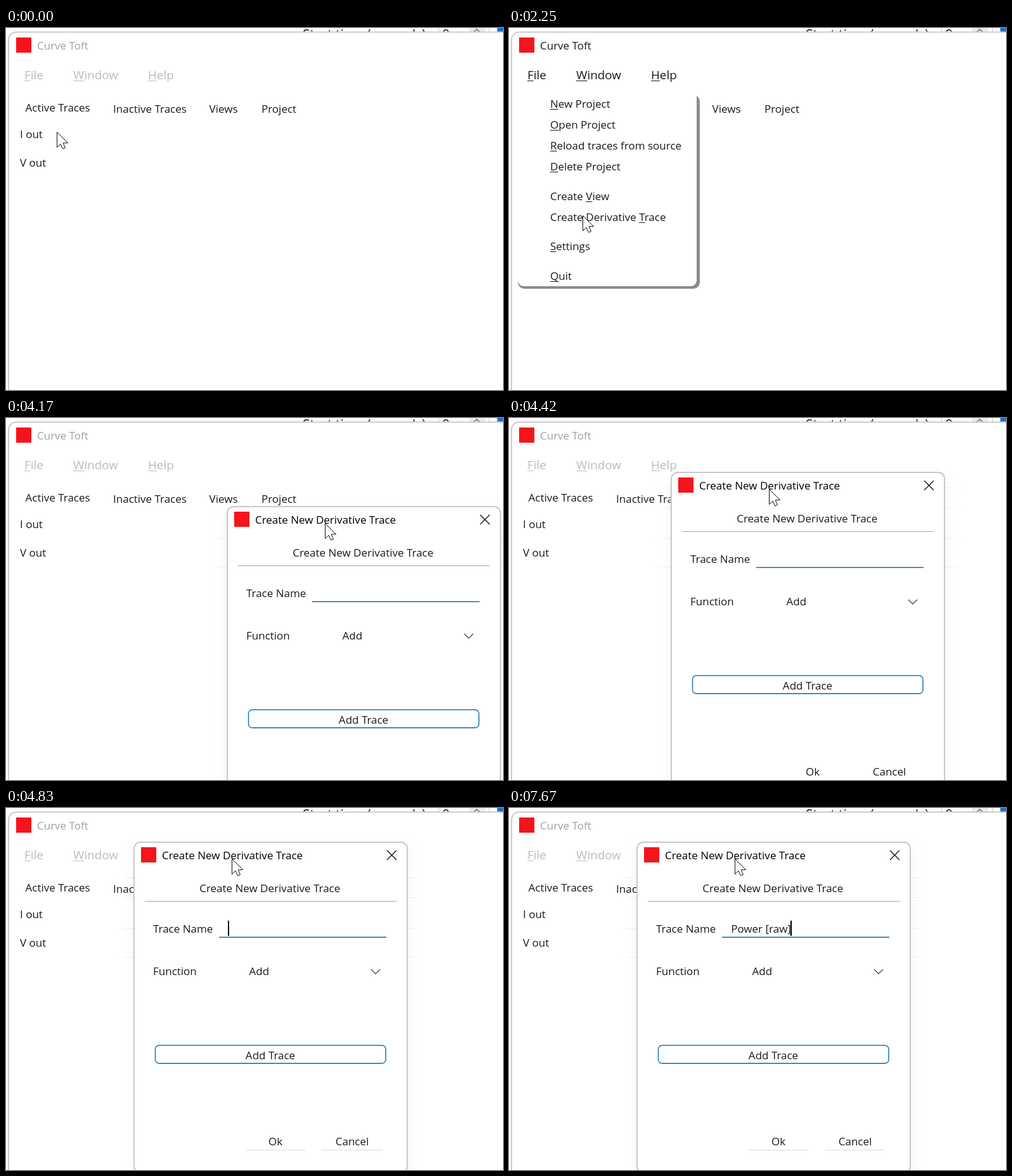
An HTML page with a canvas that plays this animation: 784 px wide and 572 px high, repeating every 8000 ms.

```html
<!DOCTYPE html>
<html lang="en">
<head>
<meta charset="utf-8">
<style>
html, body { margin: 0; height: 100%; overflow: hidden; background: #fff; }
canvas { display: block; }
</style>
</head>
<body>
<canvas id="stage" width="784" height="572"></canvas>
<script>
const c = document.getElementById('stage').getContext('2d');
const LOOP = 8000, TICK = 1000 / 12;
const INK = '#1a1a1a', FAMILY = '"Open Sans", "Noto Sans", sans-serif';

// Paths in ticks (12 per second): [tick, x, y, easing into this point]
const linear = u => u;
const smooth = u => u * u * (3 - 2 * u);
const speedUp = u => u ** 1.4;
const slowDown = u => 1 - (1 - u) ** 2;
const POINTER = [[0, 80, 164], [3, 59, 70, smooth], [16, 59, 70, linear],
  [27, 116, 296, smooth], [36, 116, 296, linear], [41, 678, 278, smooth]];
const DIALOG = [[41, 523, 251], [50, 348, 139, speedUp], [53, 255, 85, linear], [58, 201, 53, slowDown]];

const TYPED = 'Power [raw]';
const KEYS = [67, 70, 72, 73, 74, 75, 77, 87, 89, 90, 92];
const CARET = [[33, 39], [57, 63], [67, 83], [87, 96]];
const MENU = [['New Project', 126, 0], ['Open Project', 159, 0], ['Reload traces from source', 192, 0],
  ['Delete Project', 225, 0], ['Create View', 272, 7], ['Create Derivative Trace', 305, 18],
  ['Settings', 351, 0], ['Quit', 398, 0]];

function along(path, t) {
  const i = path.findIndex(p => p[0] > t);
  if (i < 1) return path.at(i).slice(1, 3);
  const [t0, x0, y0] = path[i - 1], [t1, x1, y1, ease] = path[i];
  const u = ease((t - t0) / (t1 - t0));
  return [Math.round(x0 + (x1 - x0) * u), Math.round(y0 + (y1 - y0) * u)];
}

function text(s, x, y, color = INK, size = 17, align = 'left') {
  c.font = `${size}px ${FAMILY}`;
  c.textAlign = align;
  c.fillStyle = color;
  c.fillText(s, x, y);
}

// Label with one underlined access key
function label(s, x, y, key, color, size) {
  text(s, x, y, color, size);
  const from = c.measureText(s.slice(0, key)).width;
  rect(x + from, y + 2, c.measureText(s[key]).width, 1, color);
}

function rect(x, y, w, h, color) {
  c.fillStyle = color;
  c.fillRect(x, y, w, h);
}

function box(x, y, w, h, r, fill, stroke, width = 2) {
  c.beginPath();
  c.roundRect(x, y, w, h, r);
  if (fill) { c.fillStyle = fill; c.fill(); }
  if (stroke) { c.strokeStyle = stroke; c.lineWidth = width; c.stroke(); }
}

function line(points, color, width = 1) {
  c.beginPath();
  points.forEach(p => c.lineTo(...p));
  c.strokeStyle = color;
  c.lineWidth = width;
  c.stroke();
}

const icon = (x, y) => rect(x, y, 24, 24, '#f5141c');

function backdrop() {
  rect(0, 0, 784, 572, '#fff');
  text('Start time (seconds)', 468, 18, INK, 21);
  text('0', 688, 18, INK, 21);
  rect(682, 0, 1, 7, '#ccc');
  rect(730, 0, 26, 7, '#ececec');
  rect(762, 0, 1, 7, '#ccc');
  line([[736, 8], [742.5, 2], [749, 8]], '#888', 2);
  rect(775, 0, 9, 7, '#1b6fd0');
}

function mainWindow(active) {
  box(4, 6.5, 900, 700, 12, '#fff', '#cbcbcb');
  icon(16, 15);
  text('Curve Toft', 49, 34, active ? INK : '#a0a0a0');
  const color = active ? INK : '#bcbcbc';
  label('File', 29, 81, 0, color, 18.8);
  label('Window', 106, 81, 0, color, 18.8);
  label('Help', 224, 81, 0, color, 18.8);
  text('Active Traces', 30.6, 132);
  text('Inactive Traces', 169, 134);
  text('Views', 320.6, 134);
  text('Project', 403, 134);
  text('I out', 22, 174);
  text('V out', 22, 219);
}

function menu(alpha) {
  c.globalAlpha = alpha;
  box(14, 106, 287, 306, 10, '#8c8c8c');
  box(14, 98, 282, 310, [0, 8, 9, 9], '#fff');
  for (const [s, y, key] of MENU) label(s, 65, y, key, INK);
  c.globalAlpha = 1;
}

// Row rules that show only inside the dialog's shadow
function rules(x, y) {
  const g = c.createLinearGradient(x - 26, 0, x + 459, 0);
  g.addColorStop(0, '#e8e8e800');
  g.addColorStop(0.054, '#e8e8e8');
  g.addColorStop(0.946, '#e8e8e8');
  g.addColorStop(1, '#e8e8e800');
  for (const row of [110, 141, 190, 235]) if (row > y + 12) rect(x - 26, row, 485, 1, g);
}

function dialog(x, y, t) {
  c.save();
  c.shadowColor = 'rgba(0,0,0,.05)';
  c.shadowBlur = 16;
  c.shadowOffsetY = 8;
  box(x + 1, y + 1, 431, 522, 10, '#fff');
  c.restore();
  rules(x, y);
  box(x + 1, y + 1, 431, 522, 10, '#fff', '#c9c9c9');

  c.save();
  c.translate(x, y);
  icon(12, 9);
  text('Create New Derivative Trace', 45, 28, '#000');
  line([[400, 14], [415, 29]], INK, 1.5);
  line([[415, 14], [400, 29]], INK, 1.5);
  text('Create New Derivative Trace', 215.2, 80, INK, 17, 'center');
  rect(18, 94, 397, 1, '#a3a3a3');

  text('Trace Name', 31, 144);
  rect(135, 150.5, 264, 1.5, '#1b66a5');
  const typed = TYPED.slice(0, KEYS.filter(k => k <= t).length);
  text(typed, 149.2, 144);
  if (CARET.some(([on, off]) => t >= on && t < off))
    rect(Math.floor(149 + c.measureText(typed).width), 125, 2, 24, '#000');

  text('Function', 31, 211);
  text('Add', 182.5, 211);
  line([[375, 202], [382, 209], [389, 202]], '#333', 1.1);

  box(34.5, 322, 363.5, 28.5, 6, '#fff', '#1475c4', 1.5);
  rect(40, 350, 352, 1, '#134f84');
  text('Add Trace', 216, 344, INK, 17, 'center');
  text('Ok', 224, 480, INK, 17, 'center');
  text('Cancel', 345, 480, INK, 17, 'center');
  rect(177, 487, 94, 1, '#dadada');
  rect(298, 487, 94, 1, '#dadada');
  c.restore();
}

function pointer(x, y) {
  c.beginPath();
  [[0, 0], [0, 24], [5.5, 18.8], [9, 26.5], [13, 24.8], [9.7, 17.3], [17, 17]]
    .forEach(([px, py]) => c.lineTo(x + 0.5 + px, y + 0.5 + py));
  c.closePath();
  c.fillStyle = '#fff';
  c.fill();
  c.strokeStyle = '#111';
  c.lineWidth = 1;
  c.stroke();
}

function draw(t) {
  const [x, y] = along(DIALOG, t);
  backdrop();
  mainWindow(t >= 1 && t < 33);
  if (t >= 10 && t < 32) menu(Math.min(1, (t - 9) / 3));
  if (t >= 33) dialog(x, y, t);
  pointer(...(t > 41 ? [x + 155, y + 27] : along(POINTER, t)));
}

const start = performance.now();
function frame() {
  const ms = (performance.now() - start) % LOOP;
  draw(Math.floor((ms + 4) / TICK) % 96);
  requestAnimationFrame(frame);
}
frame();
</script>
</body>
</html>
```
